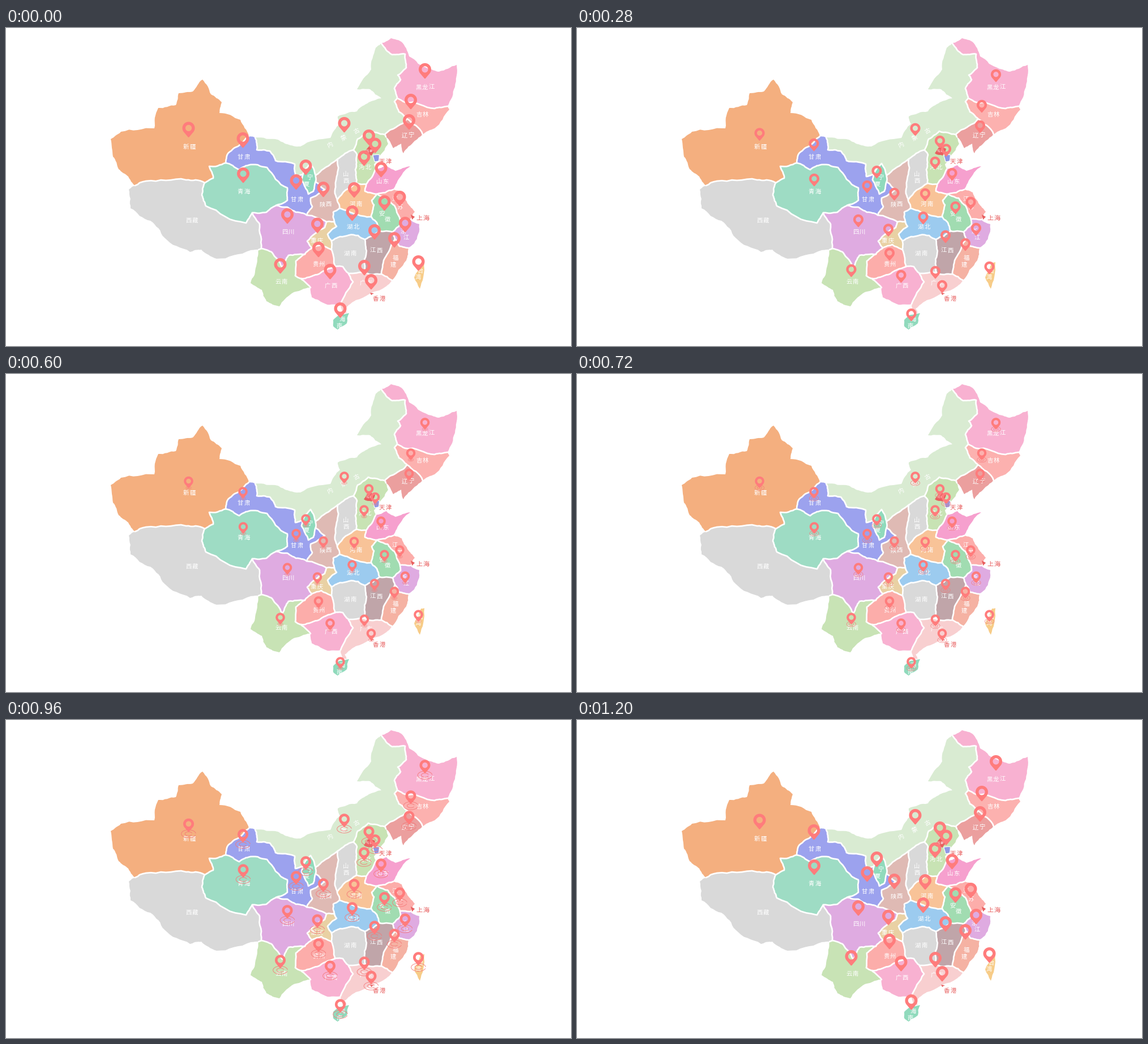
Animation of 998 by 561 pixels, one loop 1.24 s. Source, as a matplotlib script:

```python
from itertools import combinations

import numpy as np
import matplotlib.pyplot as plt
from matplotlib.animation import FuncAnimation
from matplotlib.collections import LineCollection, PathCollection
from matplotlib.patches import Polygon
from matplotlib.path import Path

W, H, DPI = 998, 561, 64
FRAMES, STEP = 31, 40
PX = 72 / DPI  # points per pixel
PIN, RED = "#ff7c7c", "#e85f5f"

fig = plt.figure(figsize=(W / DPI, H / DPI), dpi=DPI, facecolor="white")
ax = fig.add_axes([0, 0, 1, 1])
ax.set_xlim(0, W)
ax.set_ylim(H, 0)
ax.axis("off")

rng = np.random.default_rng(4)

COLORS = {
    "xj": "#f4af7f", "xz": "#d9d9d9", "qh": "#9edcc4", "gs": "#9ca2ee", "nm": "#d9ebd2",
    "hl": "#f8b1d1", "jl": "#fcb1af", "ln": "#eb9f9e", "he": "#c8e3b4", "nx": "#90dabc",
    "sn": "#dfbab4", "sx": "#d9d9d9", "sd": "#f6a0ce", "ha": "#f8c398", "js": "#fcadaa",
    "ah": "#a1dcb1", "hb": "#9ccbef", "hn": "#d9d9d9", "jx": "#c0a5a9", "zj": "#dfabe1",
    "fj": "#f5b2a3", "gd": "#f8cfd0", "gx": "#f8b1d1", "gz": "#fcadaa", "yn": "#c8e3b5",
    "sc": "#dfabe1", "cq": "#e9d1a4"}

# the points where regions (or the outside) meet
MEET = {
    "xj xz out": (228, 278), "xj gs out": (429, 191), "gs nm out": (440, 193),
    "nm hl out": (663, 27), "hl jl out": (780, 138), "jl ln out": (736, 188),
    "ln he out": (671, 192), "nm ln he": (669, 188), "he sd out": (653, 249),
    "sd js out": (684, 285), "js zj out": (714, 338), "zj fj out": (711, 388),
    "fj gd out": (682, 445), "gd gx out": (591, 487), "gx yn out": (538, 458),
    "yn xz out": (446, 391), "xj xz qh": (351, 273), "xj qh gs": (388, 238),
    "qh xz sc": (435, 326), "qh gs sc": (477, 313), "xz sc yn": (451, 389),
    "sc yn gz": (528, 399), "sc gz cq": (540, 388), "sc cq sn": (566, 342),
    "sc sn gs": (531, 330), "gs nm nx": (524, 259), "nm nx sn": (547, 260),
    "nx gs sn": (547, 271), "nm sn sx": (586, 231), "nm sx he": (614, 215),
    "nm ln jl": (708, 160), "nm jl hl": (691, 124), "sx sn ha": (585, 303),
    "sx he ha": (619, 274), "he sd ha": (636, 276), "sd ha ah js": (655, 293),
    "sn ha hb": (589, 318), "sn cq hb": (580, 342), "cq hb hn": (575, 376),
    "cq hn gz": (575, 391), "hb hn jx": (634, 373), "hb jx ah": (660, 358),
    "hb ah ha": (645, 333), "hn jx gd": (635, 432), "hn gd gx": (605, 433),
    "hn gx gz": (581, 421), "jx ah zj": (683, 360), "jx zj fj": (687, 372),
    "jx fj gd": (663, 434), "ah js zj": (696, 337), "gx gz yn": (521, 442)}

# main bends between two meeting points, on the outline
OUTLINE = {
    "xj": [(216, 262), (199, 249), (189, 227), (185, 196), (203, 183), (262, 177), (269, 141),
           (300, 136), (305, 115), (330, 112), (347, 91), (362, 117), (381, 131), (377, 150),
           (414, 162)],
    "nm": [(480, 197), (497, 205), (520, 209), (573, 194), (590, 169), (586, 156), (620, 147),
           (641, 131), (663, 124), (643, 108), (620, 108), (645, 73), (653, 35)],
    "hl": [(680, 18), (698, 24), (712, 50), (746, 72), (765, 77), (796, 65), (793, 104)],
    "jl": [(783, 144), (757, 177)],
    "ln": [(722, 199), (702, 221), (698, 204), (684, 212)],
    "he": [(675, 204), (660, 226), (650, 240)],
    "sd": [(672, 242), (688, 252), (714, 244), (692, 269)],
    "js": [(699, 290), (709, 309), (722, 324)],
    "zj": [(730, 346), (721, 380)],
    "fj": [(707, 410)],
    "gd": [(665, 460), (618, 480), (598, 495), (602, 503), (594, 502)],
    "gx": [(565, 487), (540, 475)],
    "yn": [(505, 468), (483, 491), (460, 482), (452, 462), (432, 450), (442, 420)],
    "xz": [(432, 392), (372, 407), (345, 391), (325, 395), (280, 370), (255, 340), (220, 318),
           (217, 285)]}

# and inside the country
BENDS = {
    "xj xz": [(247, 270), (318, 268)], "xj qh": [(366, 265), (359, 244)],
    "xj gs": [(391, 223), (411, 208)], "qh xz": [(346, 295), (353, 314), (424, 344)],
    "qh gs": [(412, 250), (428, 242), (461, 246), (497, 282), (497, 304)],
    "qh sc": [(460, 325)], "xz sc": [(448, 346)],
    "sc yn": [(470, 396), (488, 422), (499, 401)], "sc cq": [(532, 376), (563, 352)],
    "sc gs": [(512, 325), (497, 316)],
    "gs nm": [(443, 215), (466, 217), (476, 234), (510, 240), (511, 262)],
    "nm nx": [(538, 239)], "nx gs": [(522, 268), (534, 293), (543, 288)],
    "gs sn": [(563, 285), (538, 300), (541, 315)], "nm sn": [(563, 247)],
    "nm he": [(621, 196), (640, 182)], "nm ln": [(689, 175)],
    "nm jl": [(694, 148), (686, 130)],
    "nm hl": [(686, 107), (697, 91), (692, 83), (707, 70), (705, 46), (682, 47)],
    "hl jl": [(705, 131), (757, 142)], "sx sn": [(584, 262), (581, 292)],
    "sx he": [(620, 224), (617, 250)], "sd ha": [(634, 288)],
    "ha ah": [(646, 304), (650, 312)], "ah js": [(674, 300), (686, 313)],
    "sn hb": [(578, 325)], "cq hb": [(584, 350), (568, 364)], "cq gz": [(557, 382)],
    "hb hn": [(590, 368), (622, 366)], "hb ah": [(654, 342)], "hb ha": [(615, 328)],
    "hn jx": [(636, 400)], "hn gx": [(595, 421)], "hn gz": [(579, 405)],
    "jx fj": [(671, 403)], "ah zj": [(697, 347)], "zj fj": [(695, 385)],
    "gx gd": [(613, 448)], "gx gz": [(550, 435)], "gz yn": [(511, 437), (512, 411)]}
BENDS.update({f"{name} out": pts for name, pts in OUTLINE.items()})


def rough(pts, levels=3, amount=0.08):
    """Split each segment and push its middle sideways a little."""
    for _ in range(levels):
        a, b = pts[:-1], pts[1:]
        side = (b - a)[:, ::-1] * [1, -1]
        out = np.empty((len(pts) * 2 - 1, 2))
        out[::2] = pts
        out[1::2] = (a + b) / 2 + side * rng.uniform(-amount, amount, (len(a), 1))
        pts = out
    return pts


def dist(p, q):
    return np.hypot(p[0] - q[0], p[1] - q[1])


def make_borders():
    """Two regions share a border when they share two meeting points."""
    ends = {}
    for names, pt in MEET.items():
        for pair in combinations(names.split(), 2):
            ends.setdefault(frozenset(pair), []).append(pt)
    bends = {frozenset(k.split()): pts for k, pts in BENDS.items()}
    borders = {}
    for pair, pts in ends.items():
        if len(pts) != 2:
            continue
        (a, b), mid = pts, bends.get(pair, [])
        if mid and dist(b, mid[0]) + dist(a, mid[-1]) < dist(a, mid[0]) + dist(b, mid[-1]):
            a, b = b, a
        borders[pair] = rough(np.array([a, *mid, b], float))
    return borders


def outline(name):
    """Join the borders of one region end to end."""
    left = [p for pair, p in borders.items() if name in pair]
    ring = [left.pop(0)]
    while left:
        end = ring[-1][-1]
        k = min(range(len(left)), key=lambda i: min(dist(end, left[i][0]), dist(end, left[i][-1])))
        p = left.pop(k)
        ring.append(p if dist(end, p[0]) <= dist(end, p[-1]) else p[::-1])
    return np.vstack(ring)


def islet(color, *pts, edge="none"):
    shape = rough(np.array([*pts, pts[0]], float), 2)
    ax.add_patch(Polygon(shape, fc=color, ec=edge, lw=1.2 * PX, zorder=3))


borders = make_borders()
for name, color in COLORS.items():
    ax.add_patch(Polygon(outline(name), fc=color, ec="none", zorder=1))
ax.add_collection(LineCollection(
    [p for pair, p in borders.items() if "out" not in pair], colors="white",
    linewidths=2.7 * PX, capstyle="round", joinstyle="round", zorder=2))

islet(COLORS["nx"], (578, 515), (589, 506), (606, 503), (602, 521), (586, 532), (578, 526))
islet("#f7cc88", (733, 414), (739, 413), (737, 440), (731, 460), (721, 440))
islet("#9099e6", (648, 224), (660, 224), (658, 235), (651, 236), edge="white")
islet(RED, (632, 221), (642, 208), (652, 213), (646, 225))
islet(RED, (715, 329), (722, 333), (717, 338))
islet(RED, (643, 467), (650, 468), (645, 471))

heads = []


def place(text, x, y, rise=None, shift=-1.5, step=None, color="white", size=10.4, turn=0):
    """Set a name centred on (x, y), or walking by step from there, and its pin above."""
    dx, dy = step or (size * 1.13, 0)
    first = 0 if step else (1 - len(text)) / 2
    for k, ch in enumerate(text, ):
        px, py = x + (first + k) * dx, y + (first + k) * dy
        drop_to_base = 0 if turn else size * 0.38
        ax.text(px, py + drop_to_base, ch, color=color, fontsize=size * PX, rotation=turn,
                family="Noto Sans CJK JP", ha="center",
                va="center" if turn else "baseline", zorder=4)
    if rise is not None:
        heads.append((x + shift, y - rise))


place("新疆", 324, 209, 32.5)
place("西藏", 328, 339)
place("青海", 419.5, 288.5, 31.5, -0.5)
place("甘肃", 420, 227, 32)
place("甘肃", 514, 302, 33)
place("四川", 498.5, 359, 30)
place("云南", 486, 447, 30)
place("重庆", 549, 374.5, 29, 1)
place("贵州", 552, 416, 28, 0)
place("广西", 574, 454, 27)
place("广东", 636, 449, 29, -3)
place("湖南", 608, 397)
place("湖北", 613, 350, 26)
place("江西", 653.5, 392, 35, -2.5)
place("河南", 618, 310, 27, -3)
place("陕西", 564, 310.5, 28.5, -3.5)
place("河北", 634, 245, 18)
place("山东", 664.5, 270, 23, -2)
place("辽宁", 709.5, 188.5, 25.5, 2.5)
place("吉林", 735.5, 152.5, 25.5, -20.5)
place("黑龙江", 740, 103.5, 30.5, 0)
place("山西", 600.5, 257.5, step=(0, 12))
place("宁夏", 536, 263.5, 20.5, -6.5, step=(-5, 11))
place("安徽", 664, 326, 20, 4.5, step=(10, 11.5))
place("江苏", 687, 302, 4, 8.5, step=(9, 13))
place("浙江", 702, 358.5, 14.5, 3, step=(5, 11.5))
place("福建", 688, 405, 34, -2, step=(-4, 11.5))
place("台湾", 732, 428, 16, -3.5, step=(-4.5, 11.5))
place("海南", 594, 513.5, 18.5, -3.5, step=(-5, 11.5))
place("内蒙古", 573, 206, 38, 24.5, step=(23, -12), turn=26)
place("北京", 641.5, 217, 27, -0.5, size=5.6)
place("天津", 670, 235, 30.5, -18, color=RED)
place("上海", 736, 334.5, color=RED, size=11.2)
place("香港", 659, 477.5, 32.5, -14, color=RED)

heads = np.array(sorted(heads, key=lambda h: h[1]))


def pin_shape(r=11, tip=16.6, hole=5.6):
    """Teardrop with a round hole, its head centred on the origin."""
    side = np.arcsin(r / tip)
    a = np.linspace(side, -np.pi - side, 50)
    b = np.linspace(0, 2 * np.pi, 36)
    head = np.c_[np.cos(a), np.sin(a)] * r
    outer = np.vstack([(0.7, tip - 0.4), head, (-0.7, tip - 0.4), (0.7, tip - 0.4)])
    inner = np.c_[np.cos(b), np.sin(b)] * hole
    codes = []
    for part in (outer, inner):
        codes += [Path.MOVETO] + [Path.LINETO] * (len(part) - 2) + [Path.CLOSEPOLY]
    return np.vstack([outer, inner]), codes


SHAPE, CODES = pin_shape()
rings = LineCollection([], linewidths=PX, zorder=5)
pins = PathCollection([], facecolors=PIN, edgecolors="none", zorder=6)
ax.add_collection(rings, autolim=False)
ax.add_collection(pins, autolim=False)


def drop(t):
    """0 when the pin is raised and large, 1 when it is down and small."""
    u = np.clip((592 - abs(t - 592)) / 420, 0, 1)
    return (u + (1 - np.cos(np.pi * u)) / 2) / 2


def ring_arcs(t):
    """Two rings that grow, then are wiped away towards their left side."""
    grow = np.clip((t - 440) / 440, 0, 1)
    arcs = []
    for r, end in ((12.8, 1120), (6.4, 1030)):
        left = np.clip((end - t) / (end - 950), 0, 1)
        if grow > 0 and left > 0:
            a = np.pi * (1.03 + left * np.linspace(-1, 1, 48))
            arcs.append(np.c_[np.cos(a), np.sin(a) * 0.55] * r * grow)
    return arcs, 0.35 + 0.5 * grow


def update(i):
    t = i * STEP
    p = drop(t)
    body = SHAPE * (1 - 0.25 * p)
    pins.set_paths([Path(body + h + (0, 12.5 * p), CODES) for h in heads])
    arcs, alpha = ring_arcs(t)
    rings.set_segments([arc + h + (0, 24.3) for h in heads for arc in arcs])
    rings.set_color([(0.96, 0.47, 0.47, alpha)])
    return rings, pins


anim = FuncAnimation(fig, update, frames=FRAMES, interval=STEP, repeat=True,
                     repeat_delay=0, blit=False)
plt.show()
```
